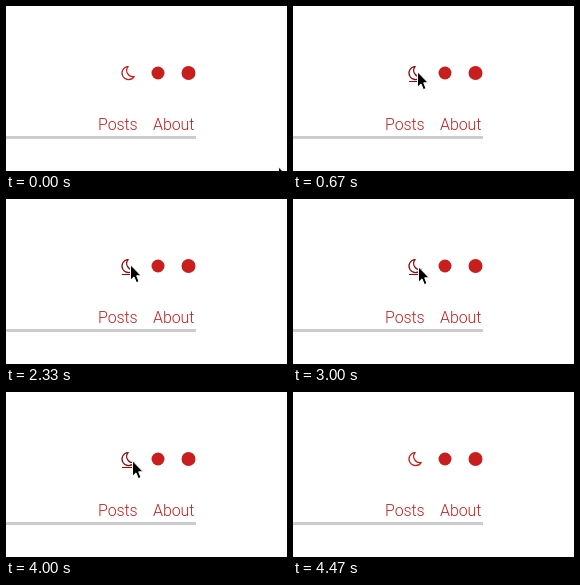
These frames come from a looping animation (281 by 165 pixels, 4940 ms). An HTML page:

```html
<!DOCTYPE html>
<html lang="en">
<head>
<meta charset="utf-8">
<title>Theme toggle</title>
<style>
  html, body { margin: 0; width: 100%; height: 100%; overflow: hidden; }
  svg { display: block; width: 281px; height: 165px; cursor: default; }
  text { font: 300 16px Roboto, "Open Sans", sans-serif; letter-spacing: -0.1px; }
</style>
</head>
<body>
<svg viewBox="0 0 281 165">
  <rect id="page" width="281" height="165"/>
  <rect id="rule" y="130" width="190" height="3"/>

  <g id="links">
    <circle cx="152" cy="67" r="6.5"/>
    <circle cx="182.5" cy="67" r="7"/>
    <text x="92" y="124">Posts</text>
    <text x="147" y="124">About</text>
  </g>

  <g id="toggle" fill="none" stroke-width="1.2" stroke-linejoin="round">
    <path id="moon" d="M122.2 60.5 A6.6 6.6 0 1 0 128.3 70.4 A6.1 6.1 0 0 1 122.2 60.5 Z"/>
    <g id="sun">
      <circle cx="121.5" cy="67.5" r="5.3"/>
      <circle cx="121.5" cy="67.5" r="6.6" stroke-dasharray="1.7 1.756"/>
    </g>
    <path id="under" d="M116 75.5 H129" stroke-width="1"/>
  </g>

  <path id="cursor" d="M0.5 0.8 V16.2 L4 12.9 L6.4 18.6 L9 17.5 L6.7 11.8 H11.2 Z"
        fill="#000" stroke="#fff"/>
</svg>
<script>
const LOOP = 4940, FPS = 15;
const el = id => document.getElementById(id);
const set = (id, name, value) => el(id).setAttribute(name, value);
const show = (id, on) => set(id, "display", on ? "inline" : "none");
const mix = (a, b, k) => a + (b - a) * k;

const themes = {
  light: { page: "#fff", rule: "#ccc", link: "#c81e1e", hover: "#8f0c0c" },
  dark: { page: "#1c1c1c", rule: "#d0d0d4", link: "#cc2020", hover: "#780808" }
};

// Pointer corner at a whole tick (1/15 s)
function pointer(n) {
  if (n < 10) {
    const u = Math.min(1, Math.max(0, (n - 1) / 8));
    const k = u * u * (3 - 2 * u);
    return [mix(272, 127, k), mix(160, 60, k)];
  }
  if (n < 40) return [124, 65];
  if (n < 45) return [125, 66];
  if (n < 60) return [125, 67];
  if (n < 62) return [126, 68];
  const k = ((n - 61) / 6) ** 1.6;
  return [mix(126, 278, k), mix(68, 170, k)];
}

function draw(ms) {
  const n = Math.floor((ms % LOOP + 4) * FPS / 1000);
  const dark = (n >= 21 && n < 35) || (n >= 48 && n < 60);
  const look = dark ? themes.dark : themes.light;
  const [x, y] = pointer(n);
  const hover = x < 127 && y < 76;

  set("page", "fill", look.page);
  set("rule", "fill", look.rule);
  set("links", "fill", look.link);
  set("toggle", "stroke", hover ? look.hover : look.link);
  show("moon", !dark);
  show("sun", dark);
  show("under", hover);
  show("cursor", n < 67);
  set("cursor", "transform", `translate(${Math.round(x)} ${Math.round(y)})`);
}

const start = performance.now();
function tick() {
  draw(performance.now() - start);
  requestAnimationFrame(tick);
}
tick();
</script>
</body>
</html>
```
